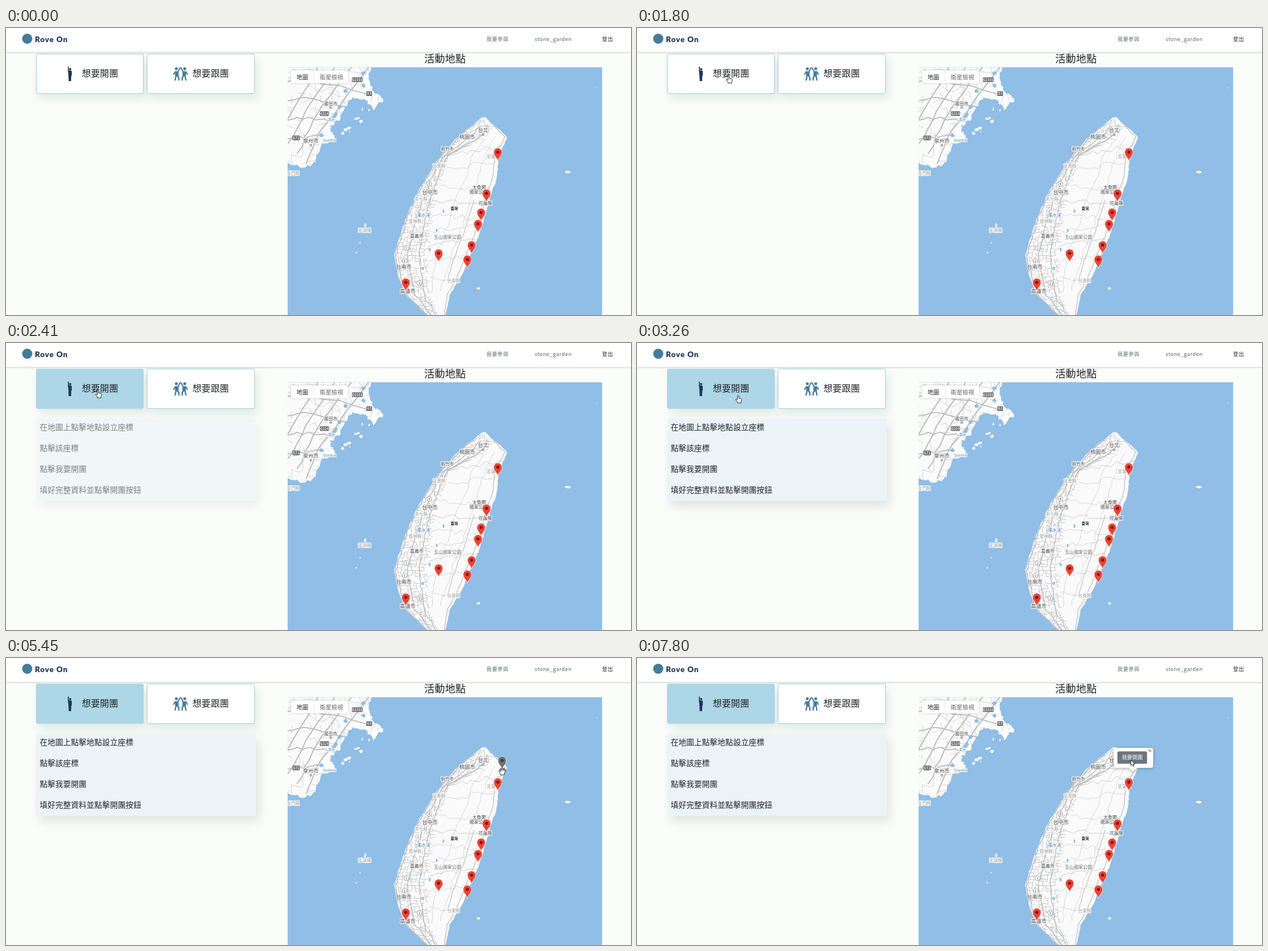
These frames come from a looping animation (1103x508 px, 8 s). An HTML page:

```html
<!DOCTYPE html>
<html lang="zh-Hant">
<head>
<meta charset="utf-8">
<title>活動地點</title>
<style>
html, body { margin: 0; width: 100%; height: 100%; overflow: hidden; background: #fbfdfa; }
svg { display: block; }
text { font-family: "Noto Sans CJK TC", "Noto Sans CJK JP", "Noto Sans", sans-serif; fill: #212529; }
.card { fill: #fff; stroke: #98ced5; filter: drop-shadow(5px 9px 9px rgba(40, 90, 90, .13)); }
.card.on { fill: #add6e6; stroke: #add6e6; }
.nav { font-size: 9.19px; letter-spacing: .574px; font-weight: 500; }
.label text { text-anchor: middle; paint-order: stroke; stroke: #fff; stroke-width: 1.8px; stroke-linejoin: round; }
.badge { font-size: 6px; font-weight: 700; }
.label .bare { stroke: none; }
.road { fill: none; stroke: #b9bbbd; stroke-linejoin: round; stroke-linecap: round; }
.cursor path { fill: #fff; stroke: #111; stroke-width: .9; stroke-linejoin: round; }
</style>
</head>
<body>
<svg id="stage" width="1103" height="508" viewBox="0 0 1103 508">
  <defs>
    <clipPath id="mapClip"><rect x="497" y="69.5" width="555" height="439"/></clipPath>
    <clipPath id="isleClip"><path id="isleEdge"/></clipPath>
    <clipPath id="coastClip"><path id="coastEdge"/></clipPath>
  </defs>

  <rect width="1103" height="42.5" fill="#fff" style="filter:drop-shadow(0 1px 1.5px rgba(0,0,0,.2))"/>
  <circle cx="37.5" cy="19" r="9" fill="#457b9d"/>
  <text x="51" y="24.5" style="font:900 13.5px Lato,sans-serif;letter-spacing:.9px;fill:#1d3557">Rove On</text>
  <text class="nav" x="848" y="23" style="fill:#55706f">我要參與</text>
  <text class="nav" x="933" y="23" style="fill:#486567">stone_garden</text>
  <text class="nav" x="1052" y="23">登出</text>

  <g font-size="16.07" font-weight="500">
    <rect id="openCard" class="card" x="53.5" y="46" width="189" height="70" rx="2.3"/>
    <rect class="card" x="249" y="46" width="189.5" height="70" rx="2.3"/>
    <text x="133.7" y="85.5">想要開團</text>
    <text x="329" y="85.5">想要跟團</text>
  </g>
  <g fill="#1d3557">
    <circle cx="113.2" cy="72.8" r="2"/>
    <path d="M109.2 68.5q.8-1 1.6 0V75l4.6.6q.7.3.7 1.5V84l-.9.3-.3 9.7h-4.2L110 81l-.8-5z"/>
  </g>
  <g stroke="#457b9d" fill="none" stroke-linecap="round" stroke-linejoin="round">
    <g id="dancer">
      <circle cx="300.6" cy="72" r="2.6" fill="#457b9d" stroke="none"/>
      <path d="M307 70.5l-3.5 7h-5l-2.6 4.5" stroke-width="2.1"/>
      <path d="M300 79l3 0v5h-3z" stroke-width="3.2"/>
      <path d="M300 85l-1.5 7M303 85l2 3v4" stroke-width="2.4"/>
    </g>
    <use href="#dancer" transform="translate(616 0) scale(-1 1)"/>
  </g>

  <g id="panel">
    <rect x="53.5" y="134" width="387.5" height="145.5" rx="2.3" fill="#ebf3f7"
      style="filter:drop-shadow(6px 10px 9px rgba(40,70,80,.13))"/>
    <g id="lines" font-size="13.79" font-weight="500"></g>
  </g>

  <text x="738" y="61.4" font-size="18.38" font-weight="500">活動地點</text>

  <g clip-path="url(#mapClip)">
    <rect x="497" y="69" width="555" height="439" fill="#90bee6"/>
    <g id="land"></g>
    <g id="labels" class="label"></g>
    <g id="pins"></g>
    <g id="popup">
      <path d="M845 159h62q4 0 4 4v27.5q0 4-4 4h-25l-7 7-7-7h-23q-4 0-4-4V163q0-4 4-4z" fill="#fff"
        style="filter:drop-shadow(0 1.5px 2.5px rgba(0,0,0,.35))"/>
      <path d="M903 161.7l4.6 4.6m0-4.6l-4.6 4.6" stroke="#444" stroke-width=".9"/>
      <g font-size="9.19" text-anchor="middle">
        <rect x="848.3" y="165.8" width="51.4" height="21" rx="2" fill="#fff" stroke="#6c757d" stroke-width=".6"/>
        <text x="874" y="179.4" style="fill:#6c757d">我要開團</text>
        <g id="filled">
          <rect x="848" y="165.5" width="52" height="21.6" rx="2.2" fill="#6c757d"/>
          <text x="874" y="179.4" style="fill:#fff">我要開團</text>
        </g>
      </g>
    </g>
    <rect x="503" y="75" width="101" height="23" rx="1" fill="#fff" style="filter:drop-shadow(0 .5px 1px rgba(0,0,0,.3))"/>
    <path d="M543.5 75v23" stroke="#e6e6e6" stroke-width=".7"/>
    <text x="512.8" y="90.9" font-size="10.33" font-weight="500">地圖</text>
    <text x="553.7" y="90.9" font-size="10.33" style="fill:#666">衛星檢視</text>
  </g>
  <g id="cursor" class="cursor"><path/></g>
</svg>
<script>
const LOOP = 8000, WATER = '#90bee6', LAND = '#fafafa';
const $ = id => document.getElementById(id);
const add = (parent, html) => $(parent).insertAdjacentHTML('beforeend', html);
const clamp = v => Math.max(0, Math.min(1, v));
const lerp = (a, b, u) => a + (b - a) * u;
const mix = (p, q, u) => [lerp(p[0], q[0], u), lerp(p[1], q[1], u)];
const range = n => [...Array(n).keys()];

let seed = 11;
function rnd() {
  seed = (seed + 0x6D2B79F5) | 0;
  let r = Math.imul(seed ^ (seed >>> 15), 1 | seed);
  r = (r + Math.imul(r ^ (r >>> 7), 61 | r)) ^ r;
  return ((r ^ (r >>> 14)) >>> 0) / 4294967296;
}
const jig = a => (rnd() - .5) * 2 * a;
const shake = (p, a) => p.map(v => v + jig(a));
const line = pts => 'M' + pts.map(p => p.map(v => v.toFixed(1))).join('L');

// Splits each span in a few parts and wobbles the new points.
const rough = (pts, amp, parts = 4) => pts.flatMap((p, i) => i === pts.length - 1 ? [p] :
  range(parts).map(k => shake(mix(p, pts[i + 1], k / parts), k ? amp : 0)));
const road = (d, w, extra = '') => `<path class="road" d="${d}" stroke-width="${w}" ${extra}/>`;
const blob = (x, y, rx, ry, fill) => {
  const ring = range(10).map(i => {
    const a = i * Math.PI / 5, k = 1 + jig(.3);
    return [x + rx * k * Math.cos(a), y + ry * k * Math.sin(a)];
  });
  return `<path d="${line(ring)}Z" fill="${fill}"/>`;
};

// Irregular street grid; at(u, v) maps the unit square to the map.
function streets(rows, cols, at, wobble, keep) {
  const node = range(rows + 1).map(r => range(cols + 1).map(c => shake(at(r / rows, c / cols), wobble)));
  let d = '';
  for (const r of range(rows))
    for (const c of range(cols)) {
      if (rnd() < keep) d += line([node[r][c], node[r][c + 1]]);
      if (rnd() < keep) d += line([node[r][c], node[r + 1][c]]);
    }
  return d;
}

// Shores of the island as x over evenly spaced y.
const TOP = 158, GAP = 35;
const shore = xs => y => {
  const k = (y - TOP) / GAP, i = Math.max(0, Math.min(xs.length - 2, Math.floor(k)));
  return lerp(xs[i], xs[i + 1], k - i);
};
const west = shore([840, 797, 766, 742, 723, 707, 695, 685, 692, 706, 743]);
const east = shore([846, 885, 869, 867, 855, 845, 834, 819, 804, 783, 776]);
const across = (y, f) => [lerp(west(y), east(y), f), y];
const plainShare = y => Math.max(1 - (y - 165) / 70, .2 + .4 * (y - 250) / 258);
const along = (y0, y1, f, step = 7) =>
  range(Math.floor((y1 - y0) / step) + 1).map(i => across(y0 + i * step, typeof f === 'function' ? f(y0 + i * step) : f));

function drawIsland() {
  const left = along(TOP, 512, 0, 4).map(p => shake(p, .8));
  const right = along(TOP, 512, 1, 4).map(p => shake(p, .8));
  const edge = line([...left.reverse(), ...right]) + 'Z';
  $('isleEdge').setAttribute('d', edge);
  let art = `<path d="${edge}" fill="${LAND}"/><g clip-path="url(#isleClip)">`;
  art += road(streets(62, 9, (u, v) => {
    const y = lerp(163, 508, u);
    return across(y, plainShare(y) * v ** 1.1);
  }, 2.4, .6), .8);
  // Passes and county borders through the mountains.
  for (const i of range(9)) {
    const y = 225 + i * 27, from = across(y, plainShare(y)), to = across(y + jig(22), .97);
    const dashed = i % 3 ? 'stroke-dasharray="1.8 1.6"' : '';
    art += road(line(rough([from, to], 5, 10)), .75, dashed);
  }
  for (const f of [.55, .75])
    art += road(line(along(195, 470, f, 9).map(p => shake(p, 3))), .75, 'stroke-dasharray="1.8 1.6"');
  for (const f of [.05, .4, .75])
    art += road(line(along(172, 508, y => f * plainShare(y)).map(p => shake(p, 1.3))), 1.4);
  art += road(line(along(172, 508, .94).map(p => shake(p, .9))), 1.2);
  art += road(line(along(305, 445, .8).map(p => shake(p, .9))), 1.1);
  for (const i of range(4)) art += blob(772 - i * 12, 324 + i * 34, 1.6, 3.5, WATER);
  return art + '</g>';
}

function drawMainland() {
  const pts = '497,69 645,69 640,90 648,112 666,126 648,146 632,126 612,122 598,140 590,162 572,172 580,196 556,208 546,238 528,247 497,239'
    .split(' ').map(p => p.split(',').map(Number));
  const edge = line(rough(pts, 3.2, 5)) + 'Z';
  $('coastEdge').setAttribute('d', edge);
  let art = `<path d="${edge}" fill="${LAND}"/><g clip-path="url(#coastClip)">`;
  art += road(streets(17, 16, (u, v) => [lerp(495, 665, v), lerp(66, 245, u)], 5, .33), .6);
  // Highways beside the coast, then the ones from inland to the sea.
  for (const k of range(4)) {
    art += road(line(rough([[530 - 16 * k, 240 - 18 * k], [556 - 14 * k, 180 - 16 * k], [640 - 30 * k, 69]], 2.5)), 2);
    art += road(line(rough([[497, 95 + 34 * k], [535, 90 + 34 * k], [640 - 28 * k, 118 + 24 * k]], 3)), 1.8);
  }
  for (const i of range(9)) art += blob(628 - i * 9 + jig(14), 84 + i * 13 + jig(6), 3.5, 3.5, WATER);
  art += '</g>';
  for (const i of range(12)) art += blob(648 - i * 6 + jig(9), 140 + i * 5 + jig(9), 1 + 3 * rnd(), 1 + 2 * rnd(), LAND);
  return art;
}

const islets = () => [[507, 256, 9, 5], [992, 255, 5, 2], [834, 461, 2.5, 2], [1043, 106, 1, .6], [634, 349, 2, 4],
  [633, 358, 7, 3], [618, 398, 1.4, 1.4], [625, 380, 1, 1.4]].map(b => blob(...b, LAND)).join('');
add('land', drawMainland() + islets() + drawIsland());

const label = (s, x, y, size, fill = '#444', weight = 500) =>
  add('labels', `<text x="${x}" y="${y + size * .36}" font-size="${size}" font-weight="${weight}" style="fill:${fill}">${s}</text>`);
const faint = '#999', blue = '#4d83ad';
[['台北', 842, 181, 9], ['桃園市', 814, 193, 9], ['新竹市', 779, 214, 7.6], ['苗栗縣', 764, 244, 7.6, faint],
 ['宜蘭縣', 860, 227, 7.6, faint], ['台中市', 748, 291, 9.2], ['彰化縣', 733, 302, 7.4, faint],
 ['太魯閣', 835, 282, 8], ['國家公園', 834, 290, 8], ['花蓮縣', 846, 310, 8], ['臺灣', 791, 319.5, 6.6, '#222', 700],
 ['濁水溪', 737, 331, 7.8, blue], ['雲林縣', 722, 342, 7.6, faint], ['嘉義市', 725, 368, 8],
 ['玉山國家公園', 779, 370, 8.1, '#666'], ['台南市', 702, 423, 9.2], ['台東縣', 790, 447, 7.6, faint],
 ['高雄市', 709, 466, 9.2], ['澎湖縣', 633, 358, 7.8, faint], ['金門縣', 507, 257, 7.6, faint],
 ['泉州市', 538, 200, 9.2], ['莆田市', 573, 134, 8], ['湄洲', 574, 162, 6, blue], ['Quanhai', 571, 199, 5.8, blue]
].forEach(a => label(...a));
for (const [x, y] of [[842, 189], [538, 207.5], [573, 141]])
  add('labels', `<circle cx="${x}" cy="${y}" r="1.6" fill="#fff" stroke="#444" stroke-width=".8"/>`);
for (const [s, x, y] of [['G1501', 620, 91.5], ['G3', 641, 116], ['G324', 562, 151.5], ['G72', 512, 194.5]]) {
  const w = 4 + 3 * s.length;
  add('labels', `<rect x="${x - w / 2}" y="${y - 4}" width="${w}" height="8" rx="1.2" fill="#606264"/>
    <text class="badge bare" x="${x}" y="${y + 2.2}" style="fill:#fff">${s}</text>`);
}
for (const [s, x, y] of [[4, 747, 276], [1, 707, 390], [1, 703.5, 412], [3, 729.5, 452]])
  add('labels', `<path d="M${x} ${y - 5}l4.6 3.3-1.7 5.4h-5.8l-1.7-5.4z" fill="#fff" stroke="#888" stroke-width=".8" stroke-linejoin="round"/>
    <text class="bare" x="${x}" y="${y + 2}" font-size="5">${s}</text>`);

const pin = (x, y, fill, dot, id = '') =>
  add('pins', `<g ${id && `id="${id}"`} transform="translate(${x} ${y})">
    <path d="M0 16C-.8 10-7.4 6.6-7.4 0A7.4 7.4 0 0 1 7.4 0C7.4 6.6 .8 10 0 16Z" fill="${fill}" stroke="#fff" stroke-width=".7"/>
    <circle r="2.7" fill="${dot}"/></g>`);
pin(875.6, 181.5, '#6f7173', '#3c3c3c', 'newPin');
for (const [x, y] of [[868, 219.7], [848, 292.8], [838.5, 326.5], [833, 346.7], [821.7, 384.3], [763.5, 398.8], [814.2, 409.6], [705.6, 450.3]])
  pin(x, y, '#ea4335', '#7d1712');

['在地圖上點擊地點設立座標', '點擊該座標', '點擊我要開團', '填好完整資料並點擊開團按鈕'].forEach((s, i) =>
  add('lines', `<text x="59.4" y="${154.3 + i * 37}">${s}</text>`));

const shapes = {
  arrow: 'M0 0V10L2.4 7.9 4 11.2 5.6 10.5 4.1 7.3H7.2Z',
  hand: 'M-1.2 .9Q0-.6 1.2 .9V5.2L5 6Q6.3 6.4 6 8L5.2 11.5V13.6H-1.2V12L-4.2 8.4Q-4.6 6.7-3 6.9L-1.2 8.2Z',
  grab: 'M-3 6.5L-6-.5Q-6-2-4.6-1.5L-3.2 .6-4.2-4Q-3.6-5.6-2.4-4.4L-1.4-1-1.2-5.4Q0-6.8 1-5.4V-1.2L2.4-5Q3.6-5.8 4-4.4L3.2-.6 5-3Q6.2-3.2 6-1.8L4 3 3 6.5Z',
  fist: 'M-3 5.5L-5 1Q-5-.6-3.6-.4L-4-2.4Q-2.6-4-1.2-3 0-4.2 1.2-3 2.6-3.8 3.6-2.4 5.4-2.4 5 0L3.4 3 3 5.5Z'
};
const shapeAt = (x, y) => x > 497 && x < 1052 && y > 69 ? 'grab' : x < 438 && y < 116 ? 'hand' : 'arrow';

const FRAME = 78;
const easeOut = u => 1 - (1 - u) ** 2;
const easeInOut = u => u * u * (3 - 2 * u);
// Each move runs on from where the last one stopped; sag bends it downwards.
const moves = [
  { from: 390, to: 1010, at: [210.5, 160.5], ease: easeOut },
  { from: 1010, to: 1160, at: [166, 103] },
  { from: 1310, to: 1580, at: [162, 84], shape: 'hand' },
  { from: 1800, to: 1900, at: [158, 75] },
  { from: 2100, to: 2100, at: [162.5, 83.5] },
  { from: 3180, to: 4050, at: [872, 203], ease: easeInOut, sag: 70 },
  { from: 4050, to: 4200, at: [876, 200.4] },
  { from: 4440, to: 4440, at: [876, 200.4], shape: 'fist' },
  { from: 4590, to: 4590, at: [876, 200.4] },
  { from: 5830, to: 6150, at: [867, 174], shape: 'hand' },
  { from: 6320, to: 6320, at: [872, 180.5], shape: 'hand' },
  { from: 7480, to: 7480, at: [871.6, 180.3], shape: 'arrow' }
];
const entry = [1086, 497];

function drawCursor(t) {
  const i = moves.findLastIndex(m => t >= m.from);
  show('cursor', i >= 0);
  if (i < 0) return;
  const m = moves[i], span = m.to - m.from;
  const held = Math.floor((t - m.from) / FRAME) * FRAME;
  const u = (m.ease || (v => v))(t >= m.to ? 1 : clamp(held / span));
  const [x, y0] = mix(i ? moves[i - 1].at : entry, m.at, u);
  const y = y0 + (m.sag || 0) * 4 * u * (1 - u);
  $('cursor').setAttribute('transform', `translate(${x.toFixed(1)} ${y.toFixed(1)})`);
  $('cursor').firstElementChild.setAttribute('d', shapes[m.shape || shapeAt(x, y)]);
}

const show = (id, on) => { $(id).style.display = on ? '' : 'none'; };
function draw(t) {
  drawCursor(t);
  $('openCard').classList.toggle('on', t >= 2100);
  const step = clamp(Math.floor((t - 2100) / FRAME) / 8);
  $('panel').style.opacity = t < 2100 ? 0 : lerp(.04, 1, Math.sin(step * Math.PI / 2));
  show('newPin', t >= 5450 && t < 6940);
  show('popup', t >= 6940);
  $('filled').style.opacity = clamp(Math.floor((t - 7560) / 80) / 3);
}

const start = performance.now();
function tick() {
  draw((performance.now() - start) % LOOP);
  requestAnimationFrame(tick);
}
tick();
</script>
</body>
</html>
```
